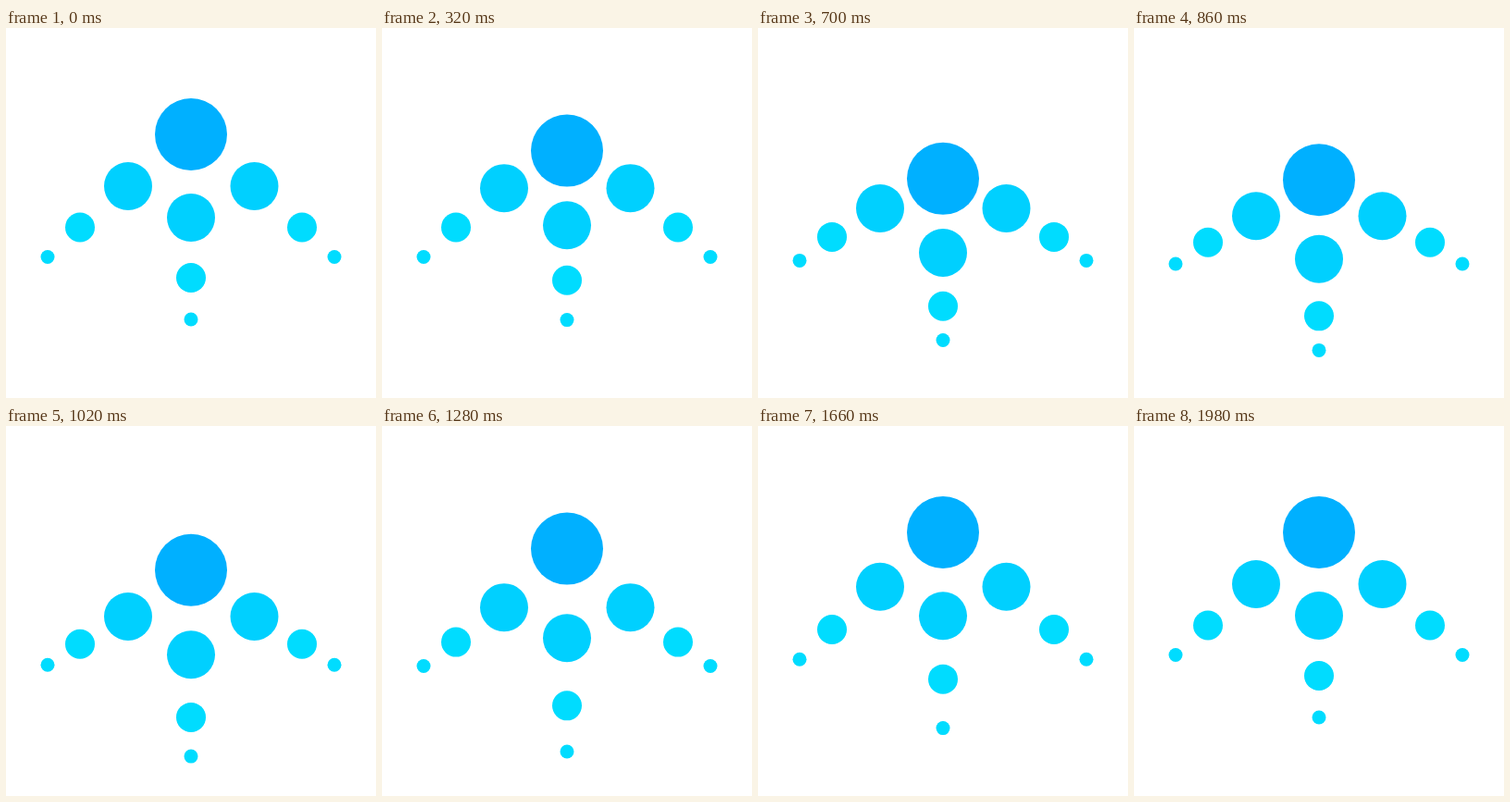
An HTML page for the animation above (2.02 s loop, 400x400 px).

```html
<!DOCTYPE html>
<html lang="en">
<head>
<meta charset="utf-8">
<title>Bobbing dots</title>
<style>
  html, body { margin: 0; width: 100%; height: 100%; overflow: hidden; background: #fff; }
  svg { display: block; width: 100%; height: 100%; }
</style>
</head>
<body>
<svg id="stage" viewBox="0 0 400 400"></svg>
<script>
const LOOP = 2020, STEP = 20, HALF = 800;

const smooth = u => u * u * (3 - 2 * u);
const gentle = u => (u + smooth(u)) / 2;

const LARGE = { r: 39, fill: '#00b0ff' };
const MEDIUM = { r: 26, fill: '#00d0ff' };
const SMALL = { r: 16, fill: '#00dcff' };
const TINY = { r: 7.5, fill: '#00dcff' };

// Each dot sinks by `drop` after `delay`, then rises back.
const dot = (kind, x, y, drop, delay, ease = smooth) => ({ ...kind, x, y, drop, delay, ease });

const dots = [
  dot(TINY, 45, 247.5, 12.3, 400),
  dot(TINY, 355, 247.5, 12.3, 400),
  dot(SMALL, 80, 215.5, 20.8, 300),
  dot(SMALL, 320, 215.5, 20.8, 300),
  dot(MEDIUM, 132, 171, 35, 200),
  dot(MEDIUM, 268.5, 171, 35, 200),
  dot(TINY, 200, 315, 45, 300, gentle),
  dot(SMALL, 200, 270, 45, 200),
  dot(MEDIUM, 200, 205, 45, 100),
  dot(LARGE, 200, 115, 50, 0)
];

const stage = document.getElementById('stage');
for (const d of dots) {
  d.node = document.createElementNS('http://www.w3.org/2000/svg', 'circle');
  d.node.setAttribute('cx', d.x);
  d.node.setAttribute('r', d.r);
  d.node.setAttribute('fill', d.fill);
  stage.append(d.node);
}

function render(ms) {
  const t = Math.floor((ms % LOOP) / STEP) * STEP;
  for (const d of dots) {
    const u = Math.max(0, 1 - Math.abs(t - d.delay - HALF) / HALF);
    d.node.setAttribute('cy', d.y + d.drop * d.ease(u));
  }
}

function tick() {
  render(performance.now());
  requestAnimationFrame(tick);
}
tick();
</script>
</body>
</html>
```
